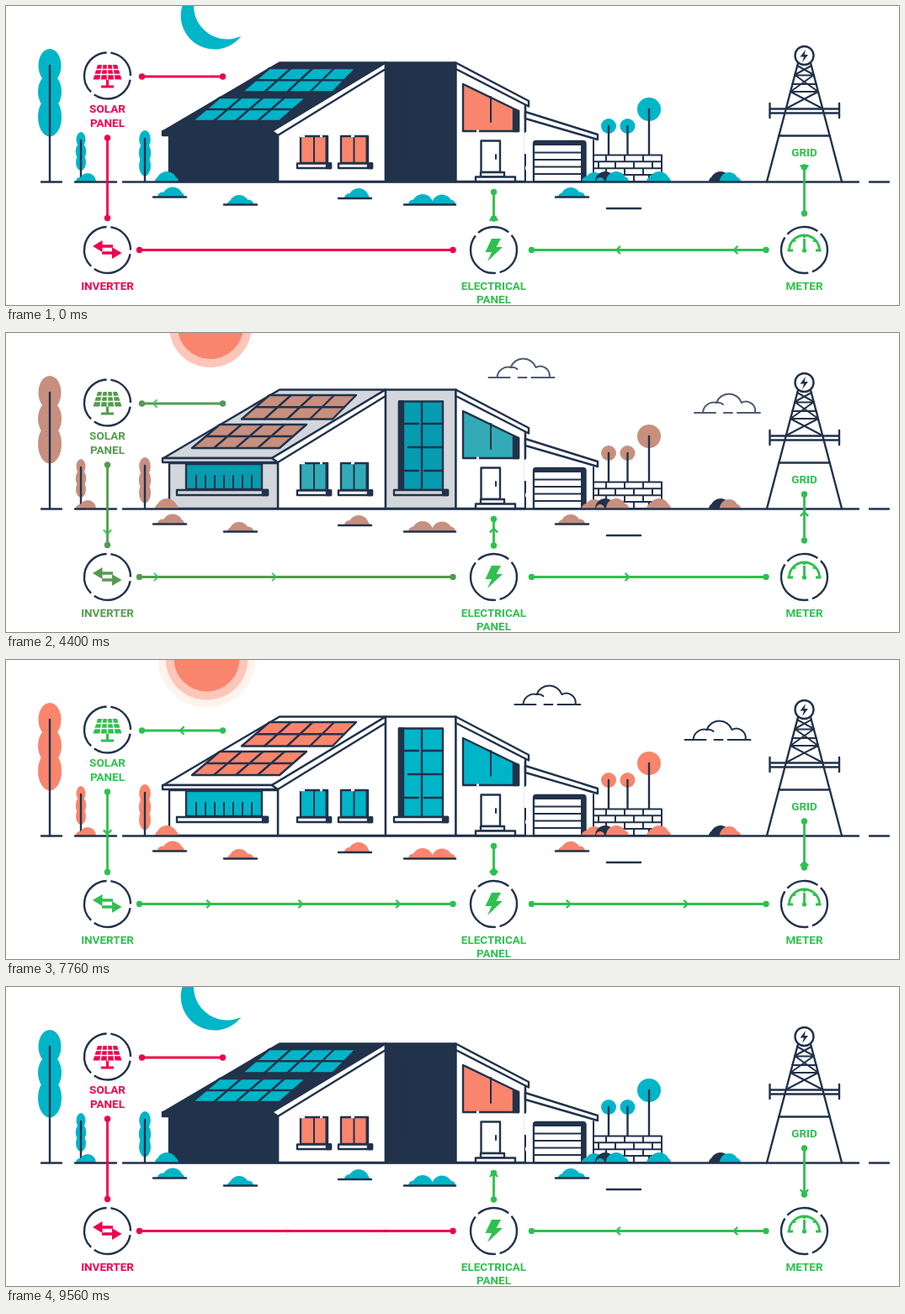
An HTML page that plays this animation: 1061 px wide and 356 px high, repeating every 9600 ms.

```html
<!DOCTYPE html>
<html lang="en">
<head>
<meta charset="utf-8">
<title>Home energy flow</title>
<style>
  html, body { margin: 0; width: 100%; height: 100%; overflow: hidden; background: #fff; }
  svg { display: block; width: 100%; height: 100%; }
  .line { stroke: var(--navy); stroke-width: 2.4; fill: none; stroke-linecap: round; stroke-linejoin: round; }
  .thin { stroke-width: 2; }
  .white { fill: #fff; }
  .wall { fill: var(--wall); }
  .glass { fill: var(--glass); }
  .lit { fill: var(--lit); }
  .leaf { fill: var(--leaf); }
  .dark { fill: var(--navy); }
  .solar { --ink: var(--flow); }
  .mains { --ink: #2fc04f; }
  .ink { fill: var(--ink); }
  .wire { stroke: var(--ink); stroke-width: 2.8; fill: none; }
  .chevron { stroke: #2fc04f; stroke-width: 2.4; fill: none; stroke-linecap: round; stroke-linejoin: round; }
  text { font: 700 13.5px Roboto, Arial, sans-serif; text-anchor: middle; fill: var(--ink); }
</style>
</head>
<body>
<svg id="stage" viewBox="0 0 1061 356">
  <defs>
    <clipPath id="horizon"><path d="M0 0H1061V209H0Z"/></clipPath>
    <g id="cloud">
      <path class="line thin" d="M-39 0H-14M-4 0H6M12 0H39M-29 0A13 13 0 0 1-13-12A16 16 0 0 1 17-12A11 11 0 0 1 33 0M-13-12Q-8-13-5-10"/>
    </g>
    <circle id="ring" class="line" r="27.5" pathLength="360" stroke-dasharray="115 10 133 10 82 10" style="stroke-linecap:butt"/>
  </defs>

  <g clip-path="url(#horizon)">
    <g id="sun">
      <circle id="halo" r="58" fill="#fff3ec"/>
      <circle r="49" fill="#fdc6b9"/>
      <circle r="39" fill="#f9856c"/>
    </g>
    <path id="moon" fill="#00b5c8" d="M-17-36A40 40 0 1 0 31 25A40 40 0 0 1-17-36Z"/>
  </g>
  <g class="clouds"><use id="cloudA" href="#cloud"/><use id="cloudB" href="#cloud"/></g>

  <!-- trees and ground -->
  <g class="leaf">
    <ellipse cx="52" cy="71" rx="13.5" ry="20"/><ellipse cx="52" cy="102" rx="14" ry="21"/><ellipse cx="52" cy="132" rx="14" ry="23.5"/>
    <ellipse cx="89" cy="159" rx="5.5" ry="9"/><ellipse cx="89" cy="173" rx="6.3" ry="10"/><ellipse cx="89" cy="186" rx="6" ry="10"/>
    <ellipse cx="165" cy="159" rx="6.8" ry="11"/><ellipse cx="165" cy="175" rx="7.2" ry="12"/><ellipse cx="165" cy="190" rx="7" ry="12.5"/>
    <circle cx="716" cy="143" r="9"/><circle cx="738.5" cy="143" r="9"/><circle cx="764" cy="123" r="14"/>
  </g>
  <path class="line" d="M52 71V209M89 160V209M165 158V209M716 143V177M738.5 143V177M764 123V177"/>

  <!-- house -->
  <g class="line">
    <path class="white" d="M323 153L451 72V209H323Z"/>
    <path class="wall" d="M194 155H323V209H194Z"/>
    <path class="wall" d="M187 149L325 67.5H451L316 149Z"/>
    <path class="wall" d="M186 149H316L323 154H186Z"/>
    <path class="white" d="M316 149L451 67.5V75L323 154Z"/>
    <path class="wall" d="M451 67.5H534.5V209H451Z"/>
    <path class="white" d="M534.5 70L617 115V209H534.5Z"/>
    <path class="white" d="M617 130L698 157V209H617Z" stroke="none"/>
    <path class="white" d="M617 126L703 153V159L617 134Z"/>
    <path class="white" d="M534.5 67.5L621 113V119.5L534.5 75Z"/>
    <path d="M617 121V149" />
    <path class="thin" d="M617 177V190M617 196V209M698 160V209"/>
  </g>
  <path fill="#fff" d="M615.5 151H618.5V176H615.5Z"/>

  <!-- roof panels -->
  <g class="line leaf" stroke-width="3">
    <path d="M313 74H416L388 102.5H280Z"/>
    <path d="M254 109H357L325 137H221Z"/>
    <path d="M338.7 74L307 102.5M364.5 74L334 102.5M390 74L361 102.5M296.5 88.2H402M279.7 109L247 137M305.5 109L273 137M331 109L299 137M237.5 123H341"/>
  </g>

  <!-- windows and doors -->
  <g class="line">
    <path class="glass" d="M214 156H304V186H214Z"/>
    <path class="thin" d="M226 170V186M237 170V186M248 170V186M259 170V186M270 170V186M281 170V186M292 170V186"/>
    <path class="wall" d="M203 187H311V193H203Z"/><path class="dark" d="M305 187H311V193H305Z"/>
    <path class="glass" d="M467 81.5H519V187H467Z"/>
    <path class="dark" d="M467 81.5H472V187H467Z"/>
    <path d="M494 82V187M473 108H490M495 108H519M478 136H519M473 164H490M497 164H519"/>
    <path class="wall" d="M461 187H525V193H461Z"/><path class="dark" d="M519 187H525V193H519Z"/>
    <path class="lit" d="M350 155H382V187H350Z"/><path class="thin" d="M366 156V187M380.5 156V187"/>
    <path class="white" d="M346 187.5H386V193H346Z"/><path class="dark" d="M381 187.5H386V193H381Z"/>
    <path class="lit" d="M398 155H430V187H398Z"/><path class="thin" d="M413.5 156V187M428.5 156V187"/>
    <path class="white" d="M395 187.5H435V193H395Z"/><path class="dark" d="M430 187.5H435V193H430Z"/>
    <path class="lit" d="M543 93L609 125V149H543Z"/>
    <path class="dark" d="M603 123L609 125V149H603Z"/>
    <path class="thin" d="M576 108V138"/>
    <path class="white" d="M564.5 160.5H587V198H564.5Z"/>
    <path class="thin" d="M582 177V182"/>
    <path class="white" d="M564 198H592V203.5H564Z"/><path class="white" d="M558 203.5H605V209H558Z"/>
    <path class="dark" d="M627 209V164Q627 161 630 161H685Q688.5 161 688.5 164V209Z"/>
    <path class="white" stroke="none" d="M628 166H683V208H628Z"/>
    <path class="thin" d="M628 174.5H683M628 183H683M628 191.5H683M628 200H683"/>
  </g>
  <path fill="#fff" d="M349 153.5H355V156.3H349ZM373 153.5H376V156.3H373ZM410 153.5H414V156.3H410ZM559 147.6H562V150.4H559Z"/>

  <!-- brick wall -->
  <path class="line thin white" d="M698 177.5H779V209H698ZM698 185.3H779M698 193.2H779M698 201H779M713 177.5V185.3M735 177.5V185.3M757 177.5V185.3M704 185.3V193.2M724 185.3V193.2M746 185.3V193.2M768 185.3V193.2M713 193.2V201M735 193.2V201M757 193.2V201M746 201V209M764 201V209"/>
  <g id="bushes"></g>
  <path class="line" d="M42 209.5H66M82 209.5H131M139 209.5H1013M1026 209.5H1049M714 241H754"/>

  <!-- pylon -->
  <g class="line">
    <circle class="white" cx="948.5" cy="59" r="11"/>
    <path d="M941 68L904 209M956 68L993 209M918 154.5H979M908 122.5H990M908 127.5H990M907.5 116V133M990 116V133"/>
    <path class="thin" d="M937 82.5H960M932 102H965M940 71L960 82L932 102L970 122M957 71L937 82L965 102L927 122M934 93H963"/>
  </g>
  <path class="dark" d="M950 52L943.5 60.5H948L946 67L953 58H948.7Z"/>

  <!-- diagram -->
  <g class="rings">
    <use href="#ring" transform="translate(120.5 83) rotate(10)"/>
    <use href="#ring" transform="translate(120.5 290.5) rotate(10)"/>
    <use href="#ring" transform="translate(579.5 290.5) rotate(-40)"/>
    <use href="#ring" transform="translate(948.5 290.5) rotate(-45)"/>
  </g>
  <g class="solar">
    <path class="ink" d="M109 70H132L137.500 87.500H103.500ZM119 87H122V95H119ZM113 94.500H128V97.500H113Z"/>
    <path d="M107 75.500H134M105 81.500H136M114.700 70L112 88M120.500 70V88M126.300 70L129 88" stroke="#fff" stroke-width="1.500"/>
    <path class="ink" d="M103 286L114.500 279V284.200H127V287.800H114.500V293ZM137.500 294L126 287.300V292.200H114V295.800H126V301Z"/>
    <text x="120.500" y="127">SOLAR</text><text x="120.500" y="143.500">PANEL</text>
    <text x="120.500" y="337.500">INVERTER</text>
  </g>
  <g class="mains">
    <path class="ink" d="M577 277H588L582.500 287H590L572 304L577 293H569.500Z"/>
    <path class="wire" stroke-width="2" d="M930.500 291A18 18 0 0 1 966.500 291M928.500 291H935M962 291H968.500M948.500 277V291M948.500 273V276M935.800 278L938 280.300M961.200 278L959 280.300"/>
    <circle class="ink" cx="948.500" cy="291" r="2.600"/>
    <text x="579.500" y="338">ELECTRICAL</text><text x="579.500" y="354">PANEL</text>
    <text x="948.500" y="338">METER</text><text x="948.500" y="178.500">GRID</text>
  </g>
  <g id="wires"></g>
  <g id="arrows"></g>
</svg>

<script>
const LOOP = 9600;
const NAVY = [33, 50, 75], WHITE = [255, 255, 255], TEAL = [0, 181, 200],
      CORAL = [249, 133, 108], RED = [240, 0, 78], GREEN = [47, 192, 79];
const $ = id => document.getElementById(id);
const clamp = v => Math.min(1, Math.max(0, v));
const mix = (a, b, k) => `rgb(${a.map((v, i) => Math.round(v + (b[i] - v) * k))})`;

function add(parent, tag, attrs) {
  const el = document.createElementNS('http://www.w3.org/2000/svg', tag);
  for (const key in attrs) el.setAttribute(key, attrs[key]);
  return parent.appendChild(el);
}

// Bushes are half discs resting on a line: [x, y, radius].
function dome(x, y, r, cls = 'leaf') {
  add($('bushes'), 'path', { class: cls, d: `M${x - r} ${y}A${r} ${r} 0 0 1 ${x + r} ${y}Z` });
}
function patch(left, right, y, domes) {
  domes.forEach(([x, r]) => dome(x, y, r));
  add($('bushes'), 'path', { class: 'line', d: `M${left} ${y}H${right}` });
}
patch(175, 214, 227.5, [[198, 12], [186, 6], [206, 6]]);
patch(259, 298, 236.5, [[277, 11.500], [268, 5], [288, 6]]);
patch(395, 434, 229, [[419, 12], [408, 6], [427, 5]]);
patch(473, 534, 236.5, [[495, 12.500], [484, 6], [518, 12], [528, 6]]);
patch(653, 692, 227.5, [[671, 11.500], [661, 5], [682, 6]]);
for (const [x, r] of [[97, 10], [88, 5], [191, 12], [183, 6], [199, 6], [699, 11], [690, 6]]) dome(x, 209, r);
dome(712, 209, 12, 'dark');
dome(706, 209, 5);
for (const [x, r] of [[725, 12], [734, 6], [776, 12], [767, 6], [784, 6]]) dome(x, 209, r);
dome(849, 209, 12, 'dark');
dome(841, 209, 6, 'dark');
dome(859, 209, 11);
dome(868, 209, 5);

function wire(cls, x1, y1, x2, y2) {
  const g = add($('wires'), 'g', { class: cls });
  add(g, 'path', { class: 'wire', d: `M${x1} ${y1}L${x2} ${y2}` });
  add(g, 'circle', { class: 'ink', cx: x1, cy: y1, r: 3.700 });
  add(g, 'circle', { class: 'ink', cx: x2, cy: y2, r: 3.700 });
}
wire('solar', 161.500, 84, 257.500, 84);
wire('solar', 120.500, 157, 120.500, 252.500);
wire('solar', 158.500, 290.500, 531, 290.500);
wire('mains', 579.500, 221.500, 579.500, 253);
wire('mains', 624.500, 290.500, 903, 290.500);
wire('mains', 948.500, 192, 948.500, 247);

function daylight(t) {
  return t < 6000 ? clamp((t - 3600) / 1000) : 1 - clamp((t - 8520) / 1000);
}

const arrows = [];
function arrow(angle, x, y, speed, period, start, end, fade = () => 1) {
  const el = add($('arrows'), 'path', { class: 'chevron', d: 'M-2-4L2 0L-2 4' });
  arrows.push({ el, angle, x, y, speed, period, start, end, fade });
}
const withDay = t => Math.max(daylight(t), .12);
const outAt = (start, span) => t => 1 - clamp((t - start) / span);
const MAIN = 279 / 1920, FEED = 373 / 1920;

arrow(180, 257, 84, .1, 920, 3600, 9120, daylight);
arrow(90, 120.500, 157, .1, 920, 3600, 9120, daylight);
for (const [start, end] of [[3584, 9224], [4306, LOOP], [4902, LOOP]])
  arrow(0, 160, 290.500, FEED, 1880, start, end, withDay);
arrow(0, 624, 290.500, MAIN, 1920, 3615, 9375);
arrow(0, 624, 290.500, MAIN, 1920, 4575, 8740, outAt(8520, 220));
for (const start of [-1208, -248])
  arrow(180, 903, 290.500, MAIN, 1920, start, 3860, outAt(3600, 260));
for (const start of [8351, 9311])
  arrow(180, 903, 290.500, MAIN, 1920, start, LOOP);
arrow(-90, 579.500, 253, 31 / 960, 960, 0, LOOP);
arrow(90, 948.500, 192, 54 / 960, 960, 0, 3840);
arrow(-90, 948.500, 247, 54 / 960, 960, 3840, 8640);
arrow(90, 948.500, 192, 54 / 960, 960, 8640, LOOP);

const ease = p => p < .5 ? 4 * p ** 3 : 1 - (2 - 2 * p) ** 3 / 2;
const place = (el, x, y) => el.setAttribute('transform', `translate(${x} ${y})`);
function orbit(el, radius, degrees) {
  const a = degrees * Math.PI / 180;
  place(el, 501 + radius * Math.cos(a), 169 - radius * Math.sin(a));
}

function draw(t) {
  const day = daylight(t), style = $('stage').style;
  const thin = t > 8000 ? day * (1 - day) : 0;
  style.setProperty('--navy', mix(NAVY, WHITE, thin));
  style.setProperty('--wall', mix(NAVY, WHITE, day));
  style.setProperty('--glass', mix(NAVY, TEAL, day));
  style.setProperty('--lit', mix(CORAL, TEAL, day));
  style.setProperty('--leaf', mix(TEAL, CORAL, day));
  style.setProperty('--flow', mix(RED, GREEN, day));

  const dawn = ease(clamp((t - 3353) / 1200));
  const dusk = ease(clamp((t - 8193) / 1200));
  orbit($('sun'), 313, -30 + 177 * dawn + 50 * dusk);
  orbit($('moon'), 298, t < 6000 ? 148 + 50 * dawn : -20 + 168 * dusk);
  $('halo').style.opacity = clamp((day - .88) * 8);

  document.querySelector('.clouds').style.opacity = day;
  place($('cloudA'), 607 + (t - 3800) * .0092, 53);
  place($('cloudB'), 859 - (t - 3800) * .0034, 95);

  for (const a of arrows) {
    const on = t >= a.start && t < a.end;
    a.el.style.opacity = on ? a.fade(t) : 0;
    if (!on) continue;
    const d = ((t - a.start) % a.period) * a.speed, r = a.angle * Math.PI / 180;
    a.el.setAttribute('transform',
      `translate(${a.x + d * Math.cos(r)} ${a.y + d * Math.sin(r)}) rotate(${a.angle})`);
  }
}

const begin = performance.now();
function tick() {
  draw((performance.now() - begin) % LOOP);
  requestAnimationFrame(tick);
}
tick();
</script>
</body>
</html>
```
